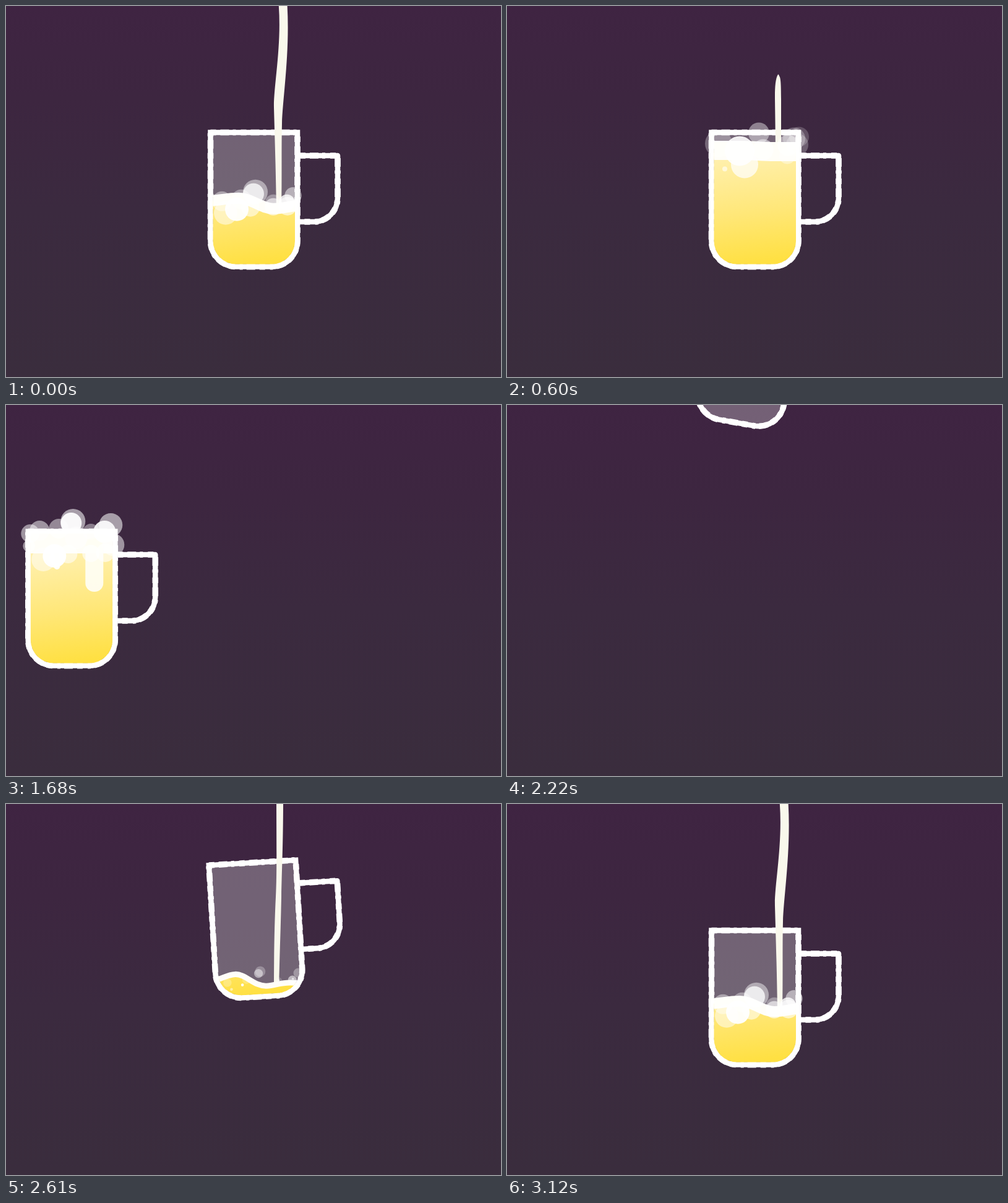
An HTML page without scripts for the animation above (3150 ms loop, 800 px wide and 600 px high).

```html
<!DOCTYPE html>
<html lang="en">
<head>
<meta charset="utf-8">
<title>Filling mug</title>
<style>
html, body { margin: 0; width: 100%; height: 100%; overflow: hidden; background: #3c2a40; }
svg { display: block; width: 100%; height: 100%; }

.mug, .level, .liquid, .drip, .stream, .low, .up, .up circle, .side circle, .low circle, .late circle, .last circle, .big circle {
  animation: 3150ms linear infinite;
}
.mug { transform-origin: 400.5px 250px; animation-name: travel, swing; }
.level { animation-name: rise; }
.liquid { fill: url(#beer); stroke: #fffef8; animation-name: slosh, thicken; }
.drip { fill: #fffef5; opacity: .93; animation-name: drip; }
.stream { fill: #f9f8ec; animation-name: pour; }
.outline { fill: none; stroke: #fff; stroke-width: 8.5; }
.rough { stroke-width: 9.6; stroke-dasharray: 9 7 14 6 5 8; }

.foam circle { fill: #fff; transform-box: fill-box; transform-origin: center; }
.up { animation-name: lift; }
.low { animation-name: sink; }
.up circle { animation-name: grow-up; }
.low circle { animation-name: grow-low; }
.side circle { animation-name: grow-side; }
.late circle { animation-name: grow-late; }
.last circle { animation-name: grow-last; }
.big circle { animation-name: grow-big; }

/* slide out to the left in 30 ms steps, then drop in from above */
@keyframes travel {
  0%, 48.57%, 49.52%, 50.47%, 51.42%, 52.38%, 53.33%, 54.28%, 55.23%, 56.19%, 57.14%, 58.09%, 59.04% { animation-timing-function: step-end; }
  0%, 48.57% { translate: 0 0; }
  49.52% { translate: -8px 0; }
  50.47% { translate: -42px 0; }
  51.42% { translate: -113px 0; }
  52.38% { translate: -205px 0; }
  53.33% { translate: -292px 0; }
  54.28% { translate: -365px 0; }
  55.23% { translate: -423px 0; }
  56.19% { translate: -468px 0; }
  57.14% { translate: -503px 0; }
  58.09% { translate: -530px 0; }
  59.04% { translate: -565px 0; }
  70.4%, 70.476% { translate: 0 -391px; }
  76.667% { translate: 0 -268px; }
  82.857% { translate: 0 -110.6px; }
  86.667%, 100% { translate: 0 0; }
}
@keyframes swing {
  0% { rotate: 0deg; }
  59.048% { rotate: 0deg; animation-timing-function: step-end; }
  70.4% { rotate: 10deg; }
  70.476% { rotate: 10deg; animation-timing-function: ease-in-out; }
  79.5% { rotate: -6.5deg; }
  82.857% { rotate: -3.46deg; }
  86.667% { rotate: -2.4deg; animation-timing-function: ease-out; }
  90%, 100% { rotate: 0deg; }
}

@keyframes rise {
  0% { translate: 0 0; }
  3.81% { translate: 0 -31px; }
  9.524% { translate: 0 -66px; }
  19.048% { translate: 0 -92.5px; }
  28.571% { translate: 0 -104px; }
  32% { translate: 0 -105px; }
  59.048% { translate: 0 -105px; animation-timing-function: step-end; }
  65%, 80% { translate: 0 135px; }
  82.857% { translate: 0 72px; }
  87.619% { translate: 0 66px; }
  93.333% { translate: 0 44px; }
  97.143% { translate: 0 22px; }
  99.048% { translate: 0 8px; }
  100% { translate: 0 0; }
}
@keyframes slosh {
  0%, 99.048%, 100% { d: path("M316 316C340 316 355 311 376 311S412 328 432 328S462 322 486 322V620H316Z"); }
  9.5% { d: path("M316 326C340 326 355 323 376 323S412 315 432 315S462 319 486 319V620H316Z"); }
  19.048% { d: path("M316 326C340 326 355 326 376 326S412 328 432 328S462 328 486 328V620H316Z"); }
  32%, 60% { d: path("M316 327C340 327 355 327 376 327S412 327 432 327S462 327 486 327V620H316Z"); }
  82.857% { d: path("M316 320C340 320 345 311 362 311S392 333 412 333S442 324 486 337V620H316Z"); }
  91% { d: path("M316 325C340 325 355 325 376 325S412 317 432 317S462 313 486 313V620H316Z"); }
}
@keyframes thicken {
  0%, 100% { stroke-width: 18px; }
  19.048% { stroke-width: 31px; }
  32%, 59% { stroke-width: 36px; }
  65%, 82.857% { stroke-width: 9px; }
}
@keyframes drip {
  0%, 23% { height: 0; animation-timing-function: ease-out; }
  34%, 59.05% { height: 88px; }
  60%, 100% { height: 0; }
}

@keyframes pour {
  0%, 99.048%, 100% { d: path("M440 -10C447 60 432 130 433 165S436 260 437 332L445 332C446 280 445 230 446 190S460 70 454 -10Z"); }
  8% { d: path("M436 -10C436 60 440 120 438 165S435 230 434 262L444 262C445 230 449 200 449 165S447 70 447 -10Z"); }
  14.5% { d: path("M438 -10C433 20 432 80 433 120S434 200 434 246L444 246C444 215 444 180 444 130S443 20 440 -10Z"); }
  17.143% { d: path("M438 63C434 70 433 90 433 110S434 200 434 242L443 242C443 215 443 180 443 120S442 70 439 63Z"); }
  19.048% { d: path("M438 110C434 116 433 130 433 145S434 200 434 238L443 238C443 215 443 190 443 150S441 116 439 110Z"); }
  23.5% { d: path("M438 225C435 226 434 227 434 228S434 230 434 231L442 231C442 230 442 229 442 228S441 226 439 225Z"); }
  23.6%, 77.1% { d: path("M437 -60C437 -54 437 -48 437 -42S439 -30 441 -24L442 -24C443 -30 446 -36 446 -42S447 -54 447 -60Z"); }
  81.5% { d: path("M437 -10C437 60 437 110 436 150S434 240 435 286L440 286C442 250 444 200 445 150S448 60 448 -10Z"); }
  82.857% { d: path("M437 -10C437 60 438 110 436 150S433 240 433 298L441 298C442 250 444 200 445 150S448 60 448 -10Z"); }
  86.667% { d: path("M437 -10C440 60 440 110 437 160S435 290 435 388L443 388C444 300 446 220 447 165S450 60 449 -10Z"); }
  92% { d: path("M441 -10C440 60 435 110 436 160S436 290 436 380L444 380C445 300 446 220 447 165S451 60 453 -10Z"); }
}

/* foam bubbles */
@keyframes lift {
  0%, 43.81% { translate: 0 0; }
  53.333%, 59% { translate: 0 -8px; }
  65%, 82.857% { translate: 0 8px; }
  97%, 100% { translate: 0 0; }
}
@keyframes sink {
  0%, 19% { translate: 0 0; }
  43.81%, 59% { translate: 0 20px; }
  65%, 100% { translate: 0 0; }
}
@keyframes grow-up {
  0%, 100% { scale: 1; fill-opacity: .82; }
  8% { scale: 1.04; fill-opacity: .8; }
  18% { scale: 1.05; fill-opacity: 0; }
  18.1%, 24% { scale: .2; fill-opacity: 0; }
  28% { scale: .45; fill-opacity: 1; }
  42%, 59.05% { scale: 1; fill-opacity: 1; }
  60%, 80% { scale: 0; fill-opacity: .5; }
  82.857% { scale: .42; fill-opacity: .5; }
  97% { scale: 1; fill-opacity: .82; }
}
@keyframes grow-low {
  0%, 8%, 100% { scale: 1; fill-opacity: 1; }
  18% { scale: 1.1; fill-opacity: 0; }
  18.1%, 24% { scale: .2; fill-opacity: 0; }
  28% { scale: .5; fill-opacity: 1; }
  42%, 59.05% { scale: 1; fill-opacity: 1; }
  60%, 81% { scale: 0; }
  82.857% { scale: .12; fill-opacity: 1; }
  97% { scale: 1; }
}
@keyframes grow-side {
  0%, 100% { scale: .72; fill-opacity: .9; }
  19.048% { scale: .95; fill-opacity: .5; }
  43.81%, 59.05% { scale: 1; fill-opacity: 1; }
  60%, 80% { scale: 0; fill-opacity: .6; }
  82.857% { scale: .4; fill-opacity: .6; }
  97% { scale: .72; fill-opacity: .9; }
}
@keyframes grow-late {
  0%, 20%, 100% { scale: 0; }
  42%, 59.05% { scale: 1; }
  60% { scale: 0; }
}
@keyframes grow-last {
  0%, 43.81%, 100% { scale: 0; }
  53.333%, 59.05% { scale: 1; }
  60% { scale: 0; }
}
@keyframes grow-big {
  0%, 5% { scale: 0; fill-opacity: 1; }
  19.048% { scale: 1; fill-opacity: 1; }
  24% { scale: 1.04; fill-opacity: .85; }
  33% { scale: 1.05; fill-opacity: 0; }
  33.1%, 100% { scale: 0; fill-opacity: 0; }
}
</style>
</head>
<body>
<svg viewBox="0 0 800 600" preserveAspectRatio="none">
  <defs>
    <linearGradient id="night" x2="0" y2="1">
      <stop stop-color="#3f2442"/>
      <stop offset=".25" stop-color="#3d2640"/>
      <stop offset=".55" stop-color="#3b2a3f"/>
      <stop offset="1" stop-color="#3a2d3d"/>
    </linearGradient>
    <linearGradient id="glow" gradientUnits="userSpaceOnUse" x1="385" y1="235" x2="408" y2="415">
      <stop stop-color="#fff0b0"/>
      <stop offset=".55" stop-color="#ffe778"/>
      <stop offset="1" stop-color="#ffe042"/>
    </linearGradient>
    <clipPath id="inside">
      <path d="M334.5 208H467V380A37.5 37.5 0 0 1 429.5 417.5H372A37.5 37.5 0 0 1 334.5 380Z"/>
    </clipPath>
    <mask id="fill" maskUnits="userSpaceOnUse" x="300" y="150" width="200" height="300">
      <g class="level"><path class="liquid" style="fill:#fff;stroke:none" d="M316 316C340 316 355 311 376 311S412 328 432 328S462 322 486 322V620H316Z"/></g>
    </mask>
    <g id="shape">
      <path d="M330.5 204.5H471V380A41.5 41.5 0 0 1 429.5 421.6H372A41.5 41.5 0 0 1 330.5 380Z"/>
      <path d="M475 242H536V310A38 39 0 0 1 498 349H475" stroke-linejoin="round"/>
    </g>
  </defs>

  <rect width="800" height="600" fill="url(#night)"/>

  <g class="mug">
    <path d="M330.5 204.5H471V380A41.5 41.5 0 0 1 429.5 421.6H372A41.5 41.5 0 0 1 330.5 380Z" fill="#fff" fill-opacity=".275"/>
    <use href="#shape" class="outline"/>
    <use href="#shape" class="outline rough"/>
  </g>

  <path class="stream" d="M437 -60C437 -54 437 -48 437 -42S439 -30 441 -24L442 -24C443 -30 446 -36 446 -42S447 -54 447 -60Z"/>

  <g class="mug">
    <g clip-path="url(#inside)">
      <rect x="320" y="190" width="160" height="240" fill="url(#glow)" mask="url(#fill)"/>
      <g class="level"><path class="liquid" style="fill:none" d="M316 316C340 316 355 311 376 311S412 328 432 328S462 322 486 322V620H316Z"/></g>
    </g>
    <rect class="drip" x="423" y="214" width="29" height="0" rx="14"/>
    <g class="level foam">
      <g class="low">
        <circle cx="355" cy="335" r="19" opacity=".5"/>
        <circle cx="373" cy="329" r="19" opacity=".95"/>
        <circle cx="395" cy="326" r="15" opacity=".55"/>
        <circle cx="432" cy="325" r="14" opacity=".6"/>
        <circle cx="455" cy="324" r="15" opacity=".6"/>
      </g>
      <g class="up">
        <circle cx="349" cy="316" r="16" opacity=".5"/>
        <circle cx="380" cy="313" r="16" opacity=".45"/>
        <circle cx="432" cy="318" r="13" opacity=".4"/>
        <circle cx="403" cy="301" r="20" opacity=".55"/>
        <circle cx="400" cy="304" r="17" opacity=".93"/>
        <g class="side">
          <circle cx="464" cy="307" r="19" opacity=".55"/>
          <circle cx="454" cy="318" r="18" opacity=".9"/>
        </g>
      </g>
      <g class="late">
        <circle cx="468" cy="331" r="18" opacity=".5"/>
        <circle cx="408" cy="320" r="18" opacity=".5"/>
      </g>
      <g class="last">
        <circle cx="334" cy="313" r="15" opacity=".5"/>
        <circle cx="332" cy="333" r="10" opacity=".5"/>
        <circle cx="377" cy="366" r="5" opacity=".9"/>
        <circle cx="377" cy="353" r="12" opacity=".8"/>
      </g>
      <g class="big">
        <circle cx="342" cy="315" r="22" opacity=".3"/>
        <circle cx="407" cy="298" r="17" opacity=".42"/>
        <circle cx="376" cy="327" r="24" opacity=".9"/>
        <circle cx="384" cy="349" r="22" opacity=".72"/>
        <circle cx="352" cy="356" r="4" opacity=".6"/>
        <circle cx="414" cy="325" r="17" opacity=".5"/>
        <circle cx="453" cy="335" r="13" opacity=".4"/>
        <circle cx="472" cy="304" r="16" opacity=".2"/>
        <circle cx="469" cy="317" r="18" opacity=".25"/>
      </g>
    </g>
  </g>
</svg>
</body>
</html>
```
